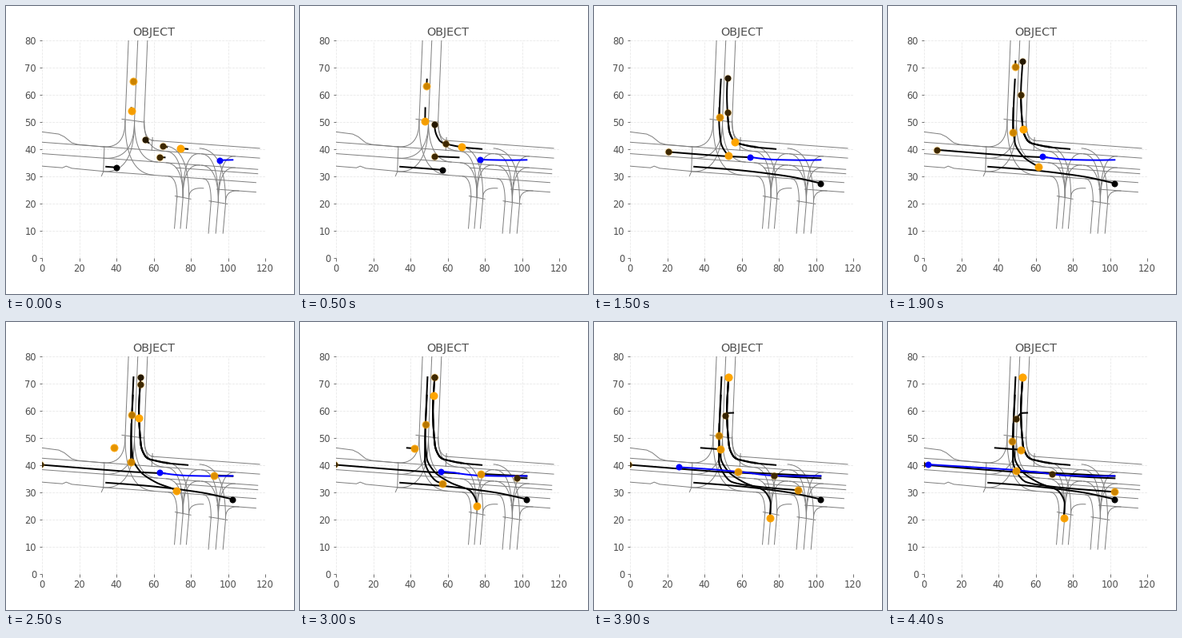
These frames come from a looping animation (360 by 360 pixels, 4.5 s). A matplotlib script:

```python
import numpy as np
import matplotlib.pyplot as plt
from matplotlib.animation import FuncAnimation

FRAMES, INTERVAL = 45, 100
INK = "#4d4d4d"
TILT = .05

plt.rcParams.update({"font.family": "DejaVu Sans", "font.size": 12})


def slopes(t, v):
    """Monotone tangents, so that a stopped vehicle does not overshoot."""
    d = np.diff(v) / np.diff(t)
    m = np.zeros(len(v))
    a, b = d[:-1], d[1:]
    same = a * b > 0
    m[1:-1][same] = 2 * a[same] * b[same] / (a[same] + b[same])
    m[0], m[-1] = d[0], d[-1]
    return m


def glide(t, v, s):
    s = np.clip(s, t[0], t[-1])
    m = slopes(t, v)
    i = np.clip(np.searchsorted(t, s, side="right") - 1, 0, len(t) - 2)
    h = t[i + 1] - t[i]
    u = (s - t[i]) / h
    return ((1 + 2 * u) * (1 - u) ** 2 * v[i] + u * (1 - u) ** 2 * h * m[i]
            + u * u * (3 - 2 * u) * v[i + 1] + u * u * (u - 1) * h * m[i + 1])


fig = plt.figure(figsize=(5, 5), dpi=72, facecolor="white")
ax = fig.add_axes([.125, .125, .775, .755])
ax.set(xlim=(0, 120), ylim=(0, 80))
ax.set_xticks(range(0, 121, 20))
ax.set_yticks(range(0, 81, 10))
ax.set_title("OBJECT", color=INK, fontsize=14.4)
ax.tick_params(colors=INK, labelsize=11.5)
ax.grid(color="#e8e8e8", lw=.8, ls="--")
ax.set_axisbelow(True)
ax.spines[:].set_visible(False)


def road(x, y):
    ax.plot(x, y, color="gray", lw=1, zorder=1)


def level(x, base):
    return base - TILT * x


def lane(base, x0, x1):
    road([x0, x1], [level(x0, base), level(x1, base)])


def turn(x, y, x1, base):
    """Curve from the end of a side road onto a main lane."""
    u = np.linspace(0, 1, 30)
    corner = level(x, base)
    road((1 - u ** 2) * x + u ** 2 * x1,
         (1 - u) ** 2 * y + 2 * u * (1 - u) * corner + u ** 2 * level(x1, base))


def draw_map():
    upper, mid, lower = 42.6, 38.4, 33.5
    for base, x0, x1 in ((upper, 0, 117), (mid, 0, 116), (lower, 33, 115),
                         (46.2, 59, 117), (36.8, 72, 116), (30, 94, 115)):
        lane(base, x0, x1)
    road([0, 9, 12, 16, 19, 33], [46.4, 45.6, 44.6, 42.4, 41.8, 40.9])
    road([0, 11, 13, 16, 33], [33.8, 33.2, 33.8, 33, 31.9])
    road([33.5, 33, 32], [41, 31.8, 30.2])
    road([59.4, 59], [44.3, 39.6])

    north = 44.7, 49.7, 54.9
    for x in north:
        road([x, x + 1.8], [50.4, 80])
    road([43, 54.9], [51.1, 50])
    left, center, right = north
    for x, x1, base in ((left, 33, upper), (center, 33, mid), (center, 33, lower),
                        (right, 60, 46.2), (right, 66, upper),
                        (center, 62, mid), (left, 60, lower)):
        turn(x, 50.4, x1, base)

    for x, y, half in ((75.8, 22.3, 3.2), (94.8, 20.5, 3.9)):
        for dx in (-half, 0, half):
            road([x + dx, x + dx - 1.4], [y - dx * .12, y - 11.4])
        road([x - half - 1, x + half + 1], [y + .5, y - .6])
        for base in (upper, mid):
            turn(x, y, x - 9, base)
            turn(x, y, x + 9, base)
        turn(x - half, y, x - 8, lower)
        turn(x + half, y, x + 11, 30)
        turn(x + half, y, x - 10, upper + 2)


class Mover:
    def __init__(self, share, keys, born=0, color="black"):
        self.born = born
        self.t, self.x, self.y = np.array(keys, float).T
        self.trail, = ax.plot([], [], color=color, lw=2,
                              zorder=2.5 if color == "blue" else 2)
        self.dots = [self.dot(8, color, 1)]
        if share:
            self.dots.append(self.dot(10, "orange", share))

    def dot(self, size, color, alpha):
        return ax.plot([], [], "o", ms=size, mew=0, color=color,
                       alpha=alpha, zorder=3)[0]

    def move(self, now):
        xs = ys = np.array([])
        if now >= self.born:
            s = np.linspace(self.t[0], now, 2 + int((now - self.t[0]) * 6))
            xs, ys = glide(self.t, self.x, s), glide(self.t, self.y, s)
        self.trail.set_data(xs, ys)
        for dot in self.dots:
            dot.set_data(xs[-1:], ys[-1:])


# Right turn into the north road, shared by three vehicles
NORTH = [(78.3, 40.1), (67.2, 40.8), (59, 42), (57.2, 42.4), (55.6, 43.3),
         (53.2, 47.4), (52.1, 60), (53, 72.3)]


def northbound(share, times):
    return Mover(share, [(t, *p) for t, p in zip(times, NORTH[-len(times):])])


draw_map()
movers = [
    Mover(0, [(-1.6, 34.5, 33.6), (5, 57.2, 32.4), (11, 85.5, 30), (15, 102.5, 27.5)]),
    northbound(.15, [-1.5, -.2, 3.7, 11, 19]),
    northbound(.25, [-1.8, 5, 6.6, 8.2, 11, 18.9, 26.5]),
    Mover(.25, [(-1.4, 66, 37), (5, 53, 37.4), (19, 6.7, 39.8), (21.2, -.7, 40.2)]),
    Mover(.8, [(-1.5, 48.9, 65.7), (5, 48.7, 63.2), (11, 48.3, 57.8), (19, 47.8, 46.2),
               (25, 47.8, 41.2), (27.2, 50.3, 37), (29.2, 55, 33.8), (34, 70.8, 32),
               (42, 102.5, 30.2)]),
    Mover(.96, [(-1.5, 48, 55.2), (5, 47.9, 50.3), (11, 48.8, 42.7), (15, 52.7, 37.8),
                (19, 61.6, 33.6), (25, 72.3, 30.5), (29, 75.6, 26), (35, 75.1, 20.6)]),
    northbound(1, [-2.5, 5.2, 12.8, 14.3, 15.6, 19, 26.5, 34]),
    Mover(.72, [(18, 49.2, 72.4), (25, 48.3, 58.5), (34, 47.9, 53), (44, 47.5, 49)],
          born=19),
    Mover(.87, [(21.6, 102.5, 36), (34, 67.8, 37.2), (44, 49.3, 38)], born=23),
    Mover(.9, [(24, 38.2, 46.4), (44, 52, 45.7)], born=25),
    Mover(.25, [(28.2, 102.5, 35.2), (34, 86.7, 35.7), (44, 69, 36.7)], born=29),
    Mover(.22, [(30.5, 55.5, 59.3), (34, 52.7, 59.2), (44, 49.6, 57)], born=32),
    Mover(0, [(-2, 102.5, 36.1), (0, 95.3, 36), (5, 77.6, 36.2), (11, 66, 37),
              (19, 63.7, 37.3), (25, 63.4, 37.3), (34, 46.1, 38.4), (44, 2.3, 40.3)],
          color="blue"),
]


def update(step):
    for m in movers:
        m.move(step)
    return []


anim = FuncAnimation(fig, update, frames=FRAMES, interval=INTERVAL,
                     repeat=True, repeat_delay=0)
plt.show()
```
